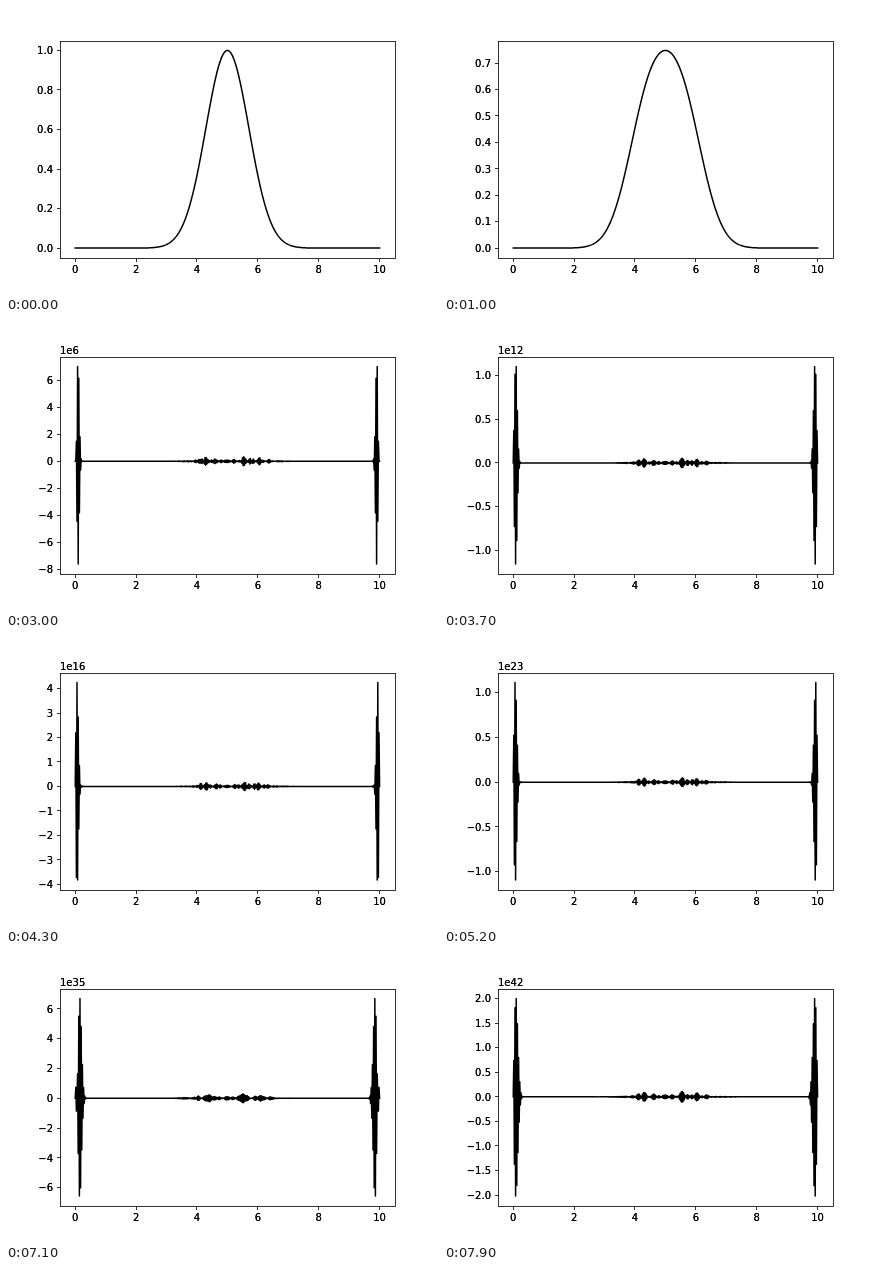
Animation, 432 px wide and 288 px high, one loop 8 s. Source, as an HTML page with a canvas:

```html
<!DOCTYPE html>
<html lang="en">
<head>
<meta charset="utf-8">
<title>Unstable wave</title>
<style>
  html, body { margin: 0; width: 100%; height: 100%; overflow: hidden; background: #fff; }
  canvas { display: block; }
</style>
</head>
<body>
<canvas id="plot" width="432" height="288"></canvas>
<script>
const ctx = document.getElementById('plot').getContext('2d');
const BOX = { left: 54, right: 388.8, top: 34.56, bottom: 252 };
const FRAMES = 80, FRAME_MS = 100, MARGIN = 0.05;
const N = 512, LENGTH = 10, DX = LENGTH / N, DT = 0.05;

const grid = Array.from({ length: N }, (_, i) => i * (LENGTH / (N - 1)));

// Wave equation with an explicit Euler step; the ends stay fixed.
function simulate() {
  let u = grid.map(x => Math.exp(-((x - 5) ** 2)));
  let v = new Array(N).fill(0);
  const rows = [];
  for (let n = 0; n < FRAMES; n++) {
    const nextU = u.map((y, i) => y + DT * v[i]);
    const nextV = v.map((s, i) => i === 0 || i === N - 1 ? 0
      : s + DT * (u[i + 1] - 2 * u[i] + u[i - 1]) / (DX * DX));
    u = nextU;
    v = nextV;
    rows.push(u);
  }
  return rows;
}

function padded(min, max) {
  const pad = (max - min) * MARGIN;
  return [min - pad, max + pad];
}

// Round tick step (at most nine intervals), with label scale and decimals.
function makeTicks([lo, hi]) {
  const raw = (hi - lo) / 9;
  const exp = Math.floor(Math.log10(raw));
  const unit = 10 ** exp;
  const mant = [1, 2, 2.5, 5, 10].find(m => m * unit >= raw * (1 - 1e-10));
  const step = mant * unit;
  const first = Math.ceil(lo / step), last = Math.floor(hi / step);
  const largest = Math.max(Math.abs(first), Math.abs(last)) * mant;
  const order = exp + Math.floor(Math.log10(largest) + 1e-9);
  const power = order >= 6 ? order : 0;
  const shown = mant * 10 ** (exp - power);
  let digits = 0;
  while (Math.abs(+shown.toFixed(digits) - shown) > shown * 1e-6) digits++;
  const ticks = [];
  for (let k = first; k <= last; k++) {
    const label = (Math.abs(k) * shown).toFixed(digits);
    ticks.push({ value: k * step, label: (k < 0 ? '\u2212' : '') + label });
  }
  return { ticks, power };
}

function scale([lo, hi], from, to) {
  return value => from + (value - lo) / (hi - lo) * (to - from);
}

function segment(x1, y1, x2, y2) {
  ctx.beginPath();
  ctx.moveTo(x1, y1);
  ctx.lineTo(x2, y2);
  ctx.stroke();
}

// Two passes give the labels their heavy edges.
function label(text, x, y, align) {
  ctx.textAlign = align;
  for (let pass = 0; pass < 2; pass++) ctx.fillText(text, x, y);
}

const xRange = padded(0, LENGTH);
const toX = scale(xRange, BOX.left, BOX.right);
const xTicks = makeTicks(xRange).ticks;
const rows = simulate();

function draw(row) {
  const yRange = padded(Math.min(...row), Math.max(...row));
  const toY = scale(yRange, BOX.bottom, BOX.top);
  const { ticks, power } = makeTicks(yRange);

  ctx.fillStyle = '#fff';
  ctx.fillRect(0, 0, 432, 288);
  ctx.fillStyle = ctx.strokeStyle = '#000';
  ctx.font = '10px "DejaVu Sans", sans-serif';

  ctx.lineWidth = 1.5;
  ctx.lineJoin = 'round';
  ctx.lineCap = 'square';
  ctx.beginPath();
  row.forEach((y, i) => ctx.lineTo(toX(grid[i]), toY(y)));
  ctx.stroke();

  ctx.lineWidth = 0.8;
  ctx.lineCap = 'butt';
  ctx.lineJoin = 'miter';
  for (const t of xTicks) {
    const x = toX(t.value), px = Math.floor(x) + 0.5;
    segment(px, 252.5, px, 256);
    label(t.label, x, 267, 'center');
  }
  for (const t of ticks) {
    const y = toY(t.value), py = Math.floor(y) + 0.5;
    segment(51, py, 54.5, py);
    label(t.label, 47, Math.round(y + 3.7), 'right');
  }
  if (power) label('1e' + power, BOX.left, 32, 'left');
  ctx.strokeRect(54.5, 35.5, 335, 217);
}

let current = -1;
function tick() {
  const index = Math.floor(performance.now() / FRAME_MS) % FRAMES;
  if (index !== current) draw(rows[current = index]);
  requestAnimationFrame(tick);
}
tick();
</script>
</body>
</html>
```
